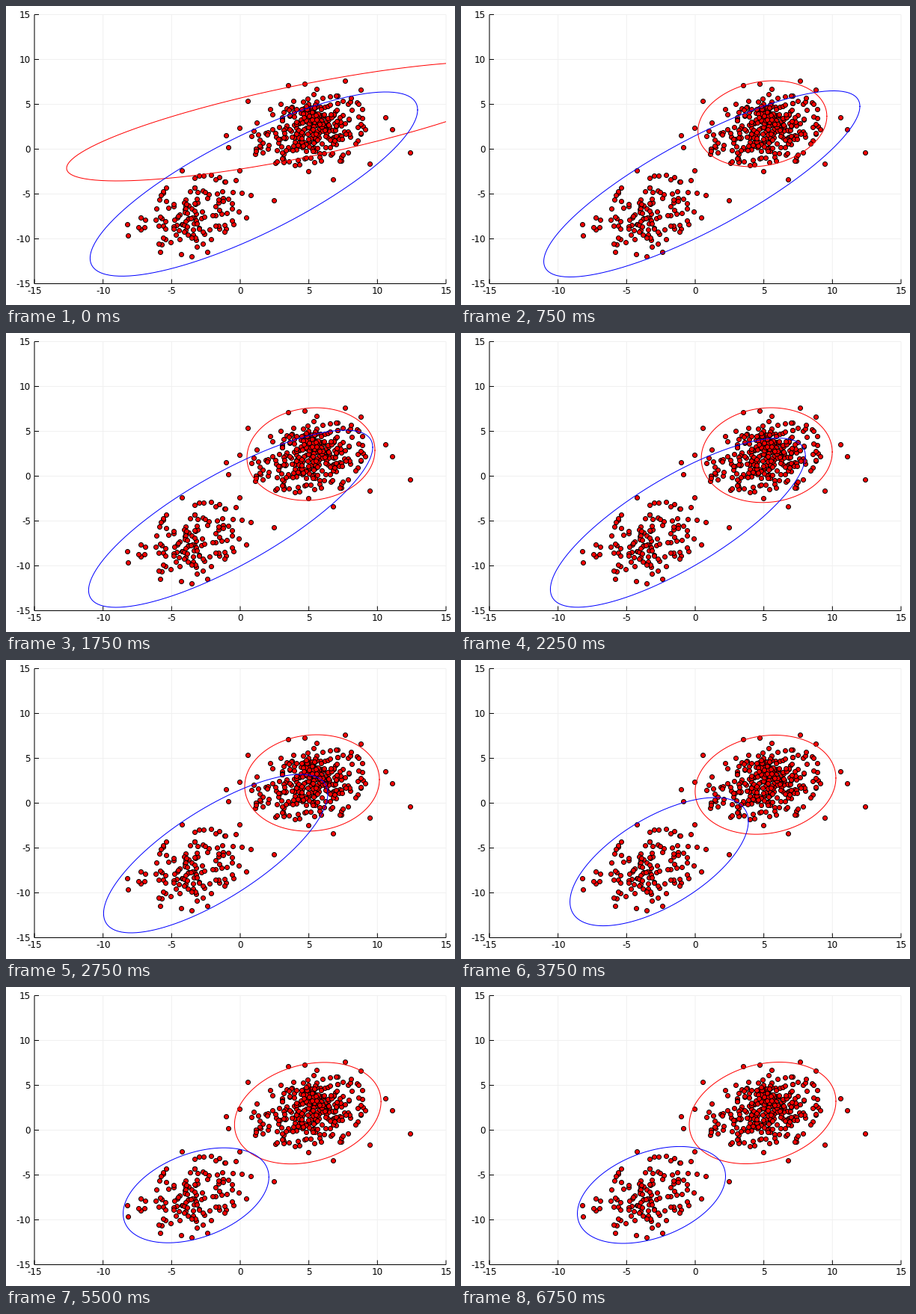
A matplotlib script that plays this animation: 600 by 400 pixels, repeating every 7 s.

```python
import numpy as np
import matplotlib.pyplot as plt
from matplotlib.animation import FuncAnimation

W, H, DPI = 600, 400, 100
LEFT, RIGHT, TOP, BOTTOM = 38, 588, 11.5, 371.5
PX = 72 / DPI
FRAMES, STEP = 28, 250

plt.rcParams["font.family"] = "DejaVu Sans"
rng = np.random.default_rng(5)


def to_data(x, y):
    """Stage pixels to axis units."""
    return (np.asarray(x) - LEFT) / (RIGHT - LEFT) * 30 - 15, \
           (BOTTOM - np.asarray(y)) / (BOTTOM - TOP) * 30 - 15


def cloud(n, cx, cy, sx, sy, rho, reach):
    """Correlated normal cloud, cut off at `reach` deviations."""
    z = rng.normal(size=(4 * n, 2))
    u, v = z[np.hypot(*z.T) < reach][:n].T
    return np.c_[cx + sx * u, cy - sy * (rho * u + np.sqrt(1 - rho**2) * v)]


# Stray points outside the two clouds
strays = [
    (162, 292), (163, 307), (180, 283), (180, 299), (206, 329), (234, 332),
    (248, 335), (269, 329), (235, 220), (312, 220), (358, 260), (323, 127),
    (312, 163), (294, 173), (297, 189), (377, 106), (399, 104), (453, 100),
    (474, 112), (507, 149), (516, 165), (540, 196), (486, 211), (437, 232),
]
points = np.vstack([
    strays,
    cloud(128, 254, 276, 42, 26.5, 0.3, 1.95),
    cloud(310, 405, 167, 38, 28, 0.2, 2.05),
])

# Key poses by step: centre x, centre y, half width, half height (px), correlation
FIRST_RED = (395.5, 154.2, 314.5, 79.8, 0.787)
POSES = {
    "red": {
        1: (400, 155, 87, 55, 0.23),
        7: (407.5, 162, 85.5, 62, 0.08),
        11: (409, 164.5, 90, 64.5, 0.07),
        19: (404, 168.5, 97, 67.5, 0.21),
        27: (403, 168.5, 98, 68, 0.23),
    },
    "blue": {
        0: (331.2, 238.2, 218.8, 123.2, 0.805),
        3: (321.8, 238, 211.2, 124.5, 0.833),
        7: (300.2, 248.5, 189.8, 118.5, 0.807),
        11: (280.2, 259, 149.8, 106, 0.755),
        15: (264.8, 269.8, 119.2, 85.8, 0.626),
        19: (256.2, 276.8, 101.8, 68.2, 0.44),
        27: (254.5, 278.2, 99, 64.8, 0.385),
    },
}


def glide(poses):
    """Cubic Hermite path through the key poses, one row per step."""
    keys = np.array(list(poses))
    p = np.array(list(poses.values()))
    m = np.gradient(p, keys, axis=0)
    m[-1] = 0
    steps = np.arange(FRAMES).clip(keys[0])
    k = np.searchsorted(keys, steps, side="right").clip(1, len(keys) - 1) - 1
    h = (keys[k + 1] - keys[k])[:, None]
    t = (steps - keys[k])[:, None] / h
    return ((1 + 2 * t) * (1 - t)**2 * p[k] + t * (1 - t)**2 * h * m[k]
            + t * t * (3 - 2 * t) * p[k + 1] + t * t * (t - 1) * h * m[k + 1])


paths = {color: glide(poses) for color, poses in POSES.items()}
paths["red"][0] = FIRST_RED


def outline(cx, cy, a, b, rho):
    s = np.linspace(0, 2 * np.pi, 241)
    return to_data(cx + a * np.cos(s), cy - b * np.cos(s - np.arccos(rho)))


fig = plt.figure(figsize=(W / DPI, H / DPI), dpi=DPI, facecolor="white")
ax = fig.add_axes([LEFT / W, 1 - BOTTOM / H, (RIGHT - LEFT) / W, (BOTTOM - TOP) / H])
ax.axis("off")
ax.set(xlim=(-15, 15), ylim=(-15, 15))


def stroke(x, y, color="black", z=2):
    ax.plot(x, y, color=color, linewidth=PX, zorder=z, snap=False,
            clip_on=False, solid_capstyle="butt")


def label(x, y, text, ha):
    fig.text(x / W, 1 - y / H, text, ha=ha, va="baseline", fontsize=12 * PX)


ends = np.array([-15, 15])
tick_w, tick_h = 6 * 30 / (RIGHT - LEFT), 6 * 30 / (BOTTOM - TOP)
for v in range(-15, 16, 5):
    stroke([v, v], ends, "#f0f0f0", 1)
    stroke(ends, [v, v], "#f0f0f0", 1)
    stroke([v, v], [-15, -15 + tick_h])
    stroke([-15, -15 + tick_w], [v, v])
    frac = (v + 15) / 30
    label(LEFT + frac * (RIGHT - LEFT), 385, str(v), "center")
    label(33, BOTTOM - frac * (BOTTOM - TOP) + 4.5, str(v), "right")
stroke([-15, -15], ends)
stroke(ends, [-15, -15])

ax.plot(*to_data(*points.T), "o", markersize=6 * PX, markerfacecolor="red",
        markeredgecolor="black", markeredgewidth=PX, zorder=3)
curves = {c: ax.plot([], [], color=c, linewidth=PX, zorder=4)[0] for c in paths}


def update(i):
    for color, curve in curves.items():
        curve.set_data(*outline(*paths[color][i]))
    return list(curves.values())


anim = FuncAnimation(fig, update, frames=FRAMES, interval=STEP, repeat=True)
plt.show()
```
